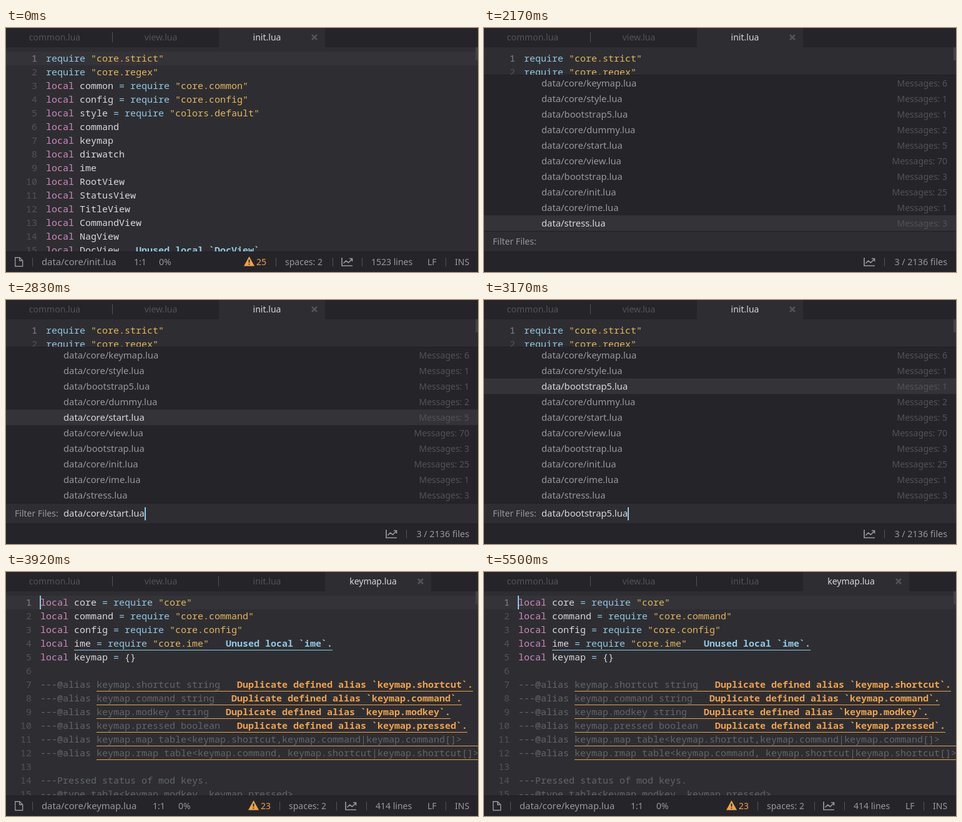
These frames come from a looping animation (756x392 px, 5580 ms). An HTML page with a canvas:

```html
<!DOCTYPE html>
<html lang="en">
<head>
<meta charset="utf-8">
<title>Editor file filter</title>
<style>
html, body { margin: 0; width: 100%; height: 100%; overflow: hidden; background: #2e2e32; }
canvas { display: block; width: 756px; height: 392px; }
</style>
</head>
<body>
<canvas id="stage" width="756" height="392"></canvas>
<script>
const W = 756, H = 392, LOOP = 5580;
const OPEN = 800, CLOSE = 3740, FIRST_KEY = 2200, KEY_GAP = 145;
const ctx = document.getElementById('stage').getContext('2d');

const C = {
  bg: '#2e2e32', bar: '#252529', text: '#97979c', accent: '#d8d8dc', dim: '#525257',
  edge: '#202024', line: '#343438', thumb: '#414146', number: '#525259', current: '#83838f',
  comment: '#626569', keyword: '#d287bd', string: '#e5b657', call: '#8fc8e6', warn: '#f2a147'
};
const mono = weight => `${weight} 15px "Noto Sans Mono", monospace`;
const CODE = mono(500), NOTE = mono(600);
const ui = size => `500 ${size}px "Noto Sans", sans-serif`;

const unused = (col, name) => ({ col, color: C.call, note: `Unused local \`${name}\`.` });
const duplicate = name => ({ col: 10, color: C.warn, note: `Duplicate defined alias \`keymap.${name}\`.` });

const init = {
  path: 'data/core/init.lua', left: 64, pos: 205, percent: 245,
  warnX: 381, warnings: '25', spacesX: 447, chartX: 538, linesX: 585, lines: '1523 lines',
  code: [
    'require "core.strict"', 'require "core.regex"',
    'local common = require "core.common"', 'local config = require "core.config"',
    'local style = require "colors.default"',
    ...'command keymap dirwatch ime RootView StatusView TitleView CommandView NagView DocView'
      .split(' ').map(name => 'local ' + name)
  ],
  notes: { 14: unused(6, 'DocView') }
};

const keymap = {
  path: 'data/core/keymap.lua', left: 55, pos: 235, percent: 276,
  warnX: 388, warnings: '23', spacesX: 453, chartX: 544, linesX: 592, lines: '414 lines',
  code: [
    'local core = require "core"', 'local command = require "core.command"',
    'local config = require "core.config"', 'local ime = require "core.ime"',
    'local keymap = {}', '',
    '---@alias keymap.shortcut string', '---@alias keymap.command string',
    '---@alias keymap.modkey string', '---@alias keymap.pressed boolean',
    '---@alias keymap.map table<keymap.shortcut,keymap.command|keymap.command[]>',
    '---@alias keymap.rmap table<keymap.command, keymap.shortcut|keymap.shortcut[]>',
    '', '---Pressed status of mod keys.', '---@type table<keymap.modkey, keymap.pressed>'
  ],
  notes: {
    3: unused(6, 'ime'), 6: duplicate('shortcut'), 7: duplicate('command'),
    8: duplicate('modkey'), 9: duplicate('pressed'), 10: duplicate('map'), 11: duplicate('rmap')
  }
};

const files = [
  ['core/keymap', 6], ['core/style', 1], ['bootstrap5', 1], ['core/dummy', 2], ['core/start', 5],
  ['core/view', 70], ['bootstrap', 3], ['core/init', 25], ['core/ime', 1], ['stress', 3]
].map(([name, count]) => ({ path: `data/${name}.lua`, count: 'Messages: ' + count }));

const clamp = v => Math.max(0, Math.min(1, v));
const ease = v => 1 - (1 - clamp(v)) ** 3;
const blink = since => since >= 0 && since % 820 < 410;

function rect(x, y, w, h, color) {
  ctx.fillStyle = color;
  ctx.fillRect(x, y, w, h);
}

function text(str, x, y, color, font, align = 'left') {
  ctx.font = font;
  ctx.fillStyle = color;
  ctx.textAlign = align;
  ctx.fillText(str, x, y);
}

function clip(x, y, w, h, draw) {
  ctx.save();
  ctx.beginPath();
  ctx.rect(x, y, w, h);
  ctx.clip();
  draw();
  ctx.restore();
}

function stroke(path, color, width) {
  ctx.strokeStyle = color;
  ctx.lineWidth = width;
  ctx.stroke(new Path2D(path));
}

function tokenColor(token) {
  if (token.startsWith('---')) return C.comment;
  if (token[0] === '"') return C.string;
  if (token === 'local') return C.keyword;
  return token === 'require' || token === '=' ? C.call : C.accent;
}

function drawTabs(count) {
  rect(0, 0, W, 31, C.bar);
  const active = count - 1;
  ['common.lua', 'view.lua', 'init.lua', 'keymap.lua'].slice(0, count).forEach((name, i) => {
    const x = i * 170 + 1, on = i === active;
    if (on) {
      rect(x, 0, 170, 31, C.bg);
      stroke(`M${x + 149} 11l8 8m0 -8l-8 8`, C.dim, 2.6);
    } else if (i < active - 1) {
      rect(x + 169, 7, 1, 16, C.dim);
    }
    text(name, x + 77, 20, on ? C.accent : C.dim, ui(14), 'center');
  });
}

function drawDoc(doc, focused, caret) {
  rect(0, 31, W, 328, C.bg);
  if (focused) rect(0, 38, W, 22, C.line);
  doc.code.forEach((line, i) => {
    const y = 54 + i * 22;
    text(i + 1, doc.left - 14, y, i ? C.number : C.current, CODE, 'right');
    for (const m of line.matchAll(/---.*|"[^"]*"|\w+|[^\s\w"]+/g))
      text(m[0], doc.left + m.index * 9, y, tokenColor(m[0]), CODE);
    const mark = doc.notes[i];
    if (!mark) return;
    const noteCol = line.length + 3;
    text(mark.note, doc.left + noteCol * 9, y, mark.color, NOTE);
    rect(doc.left + mark.col * 9, y + 5, (noteCol + mark.note.length - mark.col) * 9, 1, mark.color);
  });
  if (caret) rect(doc.left - 1, 38, 2, 22, C.call);
  rect(752, 31, 4, 21, C.thumb);
}

function drawChart(x) {
  stroke(`M${x + 1} 369v13h17M${x + 3.5} 378l4 -4l4 3l6 -6M${x + 13} 370.5h4.5v4.5`, C.text, 1.7);
}

const divider = x => rect(x, 369, 1, 14, C.dim);
const label = (str, x, color = C.text, size = 14) => text(str, x, 381, color, ui(size));

function drawStatus(doc) {
  stroke('M14.7 368.7h7l5 5v9h-12zM21.7 368.7v5h5', C.text, 1.4);
  label(doc.path, 57, C.text, 14.8);
  label('1:1', doc.pos);
  label('0%', doc.percent);
  const x = doc.warnX;
  ctx.fillStyle = C.warn;
  ctx.fill(new Path2D(`M${x + 8.5} 367l8.5 15.5h-17z`));
  rect(x + 7.6, 372, 1.8, 5, C.bar);
  rect(x + 7.6, 378.5, 1.8, 1.8, C.bar);
  label(doc.warnings, x + 20, C.warn);
  label('spaces: 2', doc.spacesX);
  drawChart(doc.chartX - 1);
  label(doc.lines, doc.linesX);
  label('LF', 675);
  label('INS', 719);
  [42, doc.spacesX - 15, doc.spacesX + 76, doc.linesX - 15, 704].forEach(divider);
}

function drawPickerStatus() {
  drawChart(608);
  divider(641);
  text('3 / 2136 files', 742, 381, C.text, ui(14.3), 'right');
}

function drawPicker(amount, row, typed, caret) {
  const inputY = 359 - 33 * amount, height = 250 * amount, top = inputY - height;
  const listY = inputY - 250;
  rect(0, top - 1, W, 1, C.edge);
  clip(0, top, W, height, () => {
    rect(0, top, W, height, C.bar);
    rect(0, listY + row * 25, W, 25, C.line);
    files.forEach((file, i) => {
      const y = listY + i * 25 + 18;
      text(file.path, 92, y, Math.round(row) === i ? C.accent : C.text, ui(14.8));
      text(file.count, 742, y, C.dim, ui(14), 'right');
    });
  });
  clip(0, inputY, W, 359 - inputY, () => {
    rect(0, inputY, W, 33, C.bg);
    rect(0, inputY, W, 1, C.edge);
    text('Filter Files:', 14, inputY + 22, C.text, ui(14));
    text(typed, 92, inputY + 22, C.accent, ui(14.8));
    if (caret) rect(Math.round(92 + ctx.measureText(typed).width), inputY + 7, 2, 21, C.call);
  });
}

function render(t) {
  const picking = t >= OPEN && t < CLOSE, opened = t >= CLOSE;
  const doc = opened ? keymap : init;
  drawTabs(opened ? 4 : 3);
  clip(0, 31, W, 328, () => drawDoc(doc, !picking, !picking && blink(t - (opened ? CLOSE : 80))));

  const amount = opened ? 1 - ease((t - CLOSE) / 100) : ease((t - OPEN) / 100);
  if (amount > 0) {
    const keys = Math.max(0, Math.min(9, Math.floor((t - FIRST_KEY) / KEY_GAP) + 1));
    const lastKey = keys ? FIRST_KEY + (keys - 1) * KEY_GAP : OPEN;
    const row = keys ? 10 - keys - ease((t - lastKey) / 45) : 9;
    const typed = keys && picking ? files[9 - keys].path : '';
    drawPicker(amount, row, typed, picking && blink(t - lastKey));
  }

  rect(0, 359, W, 33, C.bar);
  rect(0, 359, W, 1, C.edge);
  if (picking) drawPickerStatus();
  else drawStatus(doc);
}

const start = performance.now();
function tick() {
  render((performance.now() - start) % LOOP);
  requestAnimationFrame(tick);
}
tick();
</script>
</body>
</html>
```
